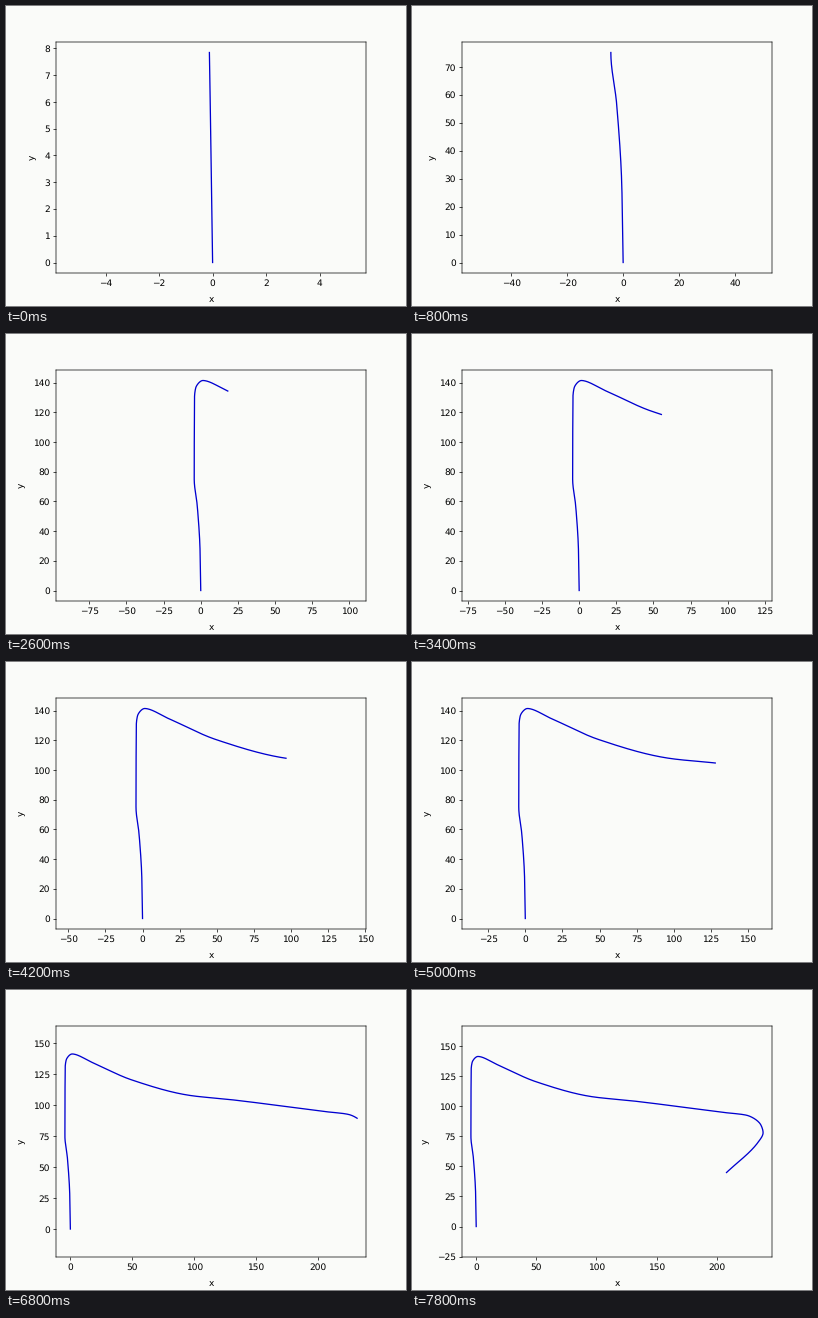
Write a matplotlib script that moves like this. It is 400 px wide and 300 px high and loops after 8 s.

```python
import matplotlib.pyplot as plt
import numpy as np
from matplotlib.animation import FuncAnimation

STEPS, INTERVAL = 40, 200
PAPER, INK = "#fafbf9", "#0000d0"
BOX_RATIO = 310 / 231  # axes width over height, in pixels

# Corners and bends of the driven path
BENDS = np.array([
    (0, 0), (-0.12, 7.85), (-0.5, 28), (-2.3, 56.5), (-4.4, 75), (-4.2, 130),
    (-3.4, 136.4), (1.4, 141.4), (18.2, 134.3), (49.4, 120.5), (96.6, 107.9),
    (127.9, 104.7), (207.2, 94.7), (224.5, 92.6), (236.2, 85.2), (238.5, 78),
    (234.5, 70.3), (208.1, 44.9)])

# Animation step -> bend reached by then
PACE = {0: 1, 8: 5, 13: 8, 21: 10, 25: 11, 30: 12, 36: 15, 39: 17}


def smooth(t, knots, values):
    """Cubic curve through the values that never overshoots them."""
    h = np.diff(knots)
    d = np.diff(values) / h
    a, b = d[:-1], d[1:]
    same = a * b > 0
    mean = 2 * a * b / np.where(same, a + b, 1)
    m = np.concatenate([d[:1], np.where(same, mean, 0), d[-1:]])
    i = np.clip(np.searchsorted(knots, t, side="right") - 1, 0, len(h) - 1)
    s = (t - knots[i]) / h[i]
    ease = s * s * (3 - 2 * s)
    return (values[i] + (values[i + 1] - values[i]) * ease
            + h[i] * s * (1 - s) * (m[i] * (1 - s) - m[i + 1] * s))


legs = np.hypot(*np.diff(BENDS, axis=0).T)
chord = np.concatenate([[0], np.cumsum(legs)])
travel = smooth(np.arange(STEPS), np.array(list(PACE)),
                chord[list(PACE.values())])


def trail(n):
    u = np.linspace(0, travel[n], 60 + int(2 * travel[n]))
    return [smooth(u, chord, axis) for axis in BENDS.T]


def fit_view(x, y):
    """Equal scales on both axes, centred on the trail."""
    height = max(1.1 * np.ptp(y), 1.061 * np.ptp(x) / BOX_RATIO)
    width = height * BOX_RATIO
    cx, cy = (x.min() + x.max()) / 2, (y.min() + y.max()) / 2
    ax.set_xlim(cx - width / 2, cx + width / 2)
    ax.set_ylim(cy - height / 2, cy + height / 2)


plt.rcParams.update({"font.size": 10.3, "text.hinting": "none",
                     "path.snap": False, "axes.labelpad": 8.5})
fig, ax = plt.subplots(figsize=(6.4, 4.8), dpi=62.5, facecolor=PAPER)
ax.set_facecolor(PAPER)
ax.set_xlabel("x")
ax.set_ylabel("y")
line, = ax.plot([], [], color=INK, lw=1.5)


def draw(n):
    x, y = trail(n)
    line.set_data(x, y)
    fit_view(x, y)
    return line,


anim = FuncAnimation(fig, draw, frames=STEPS, init_func=lambda: draw(0),
                     interval=INTERVAL, repeat=True, repeat_delay=0)
plt.show()
```
